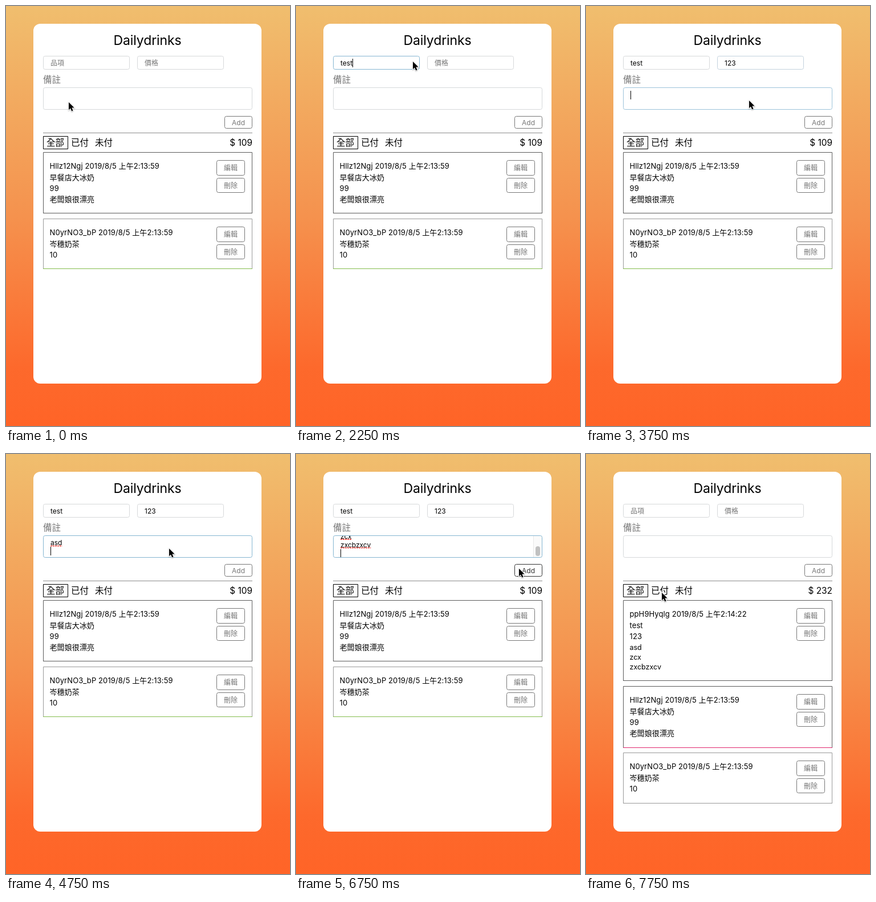
Recreate the animation shown at these times as an HTML page with a canvas. Size 498 by 733 pixels, loop 8000 ms.

```html
<!DOCTYPE html>
<html lang="zh-Hant">
<head>
<meta charset="utf-8">
<title>Dailydrinks</title>
<style>
html, body { margin: 0; width: 100%; height: 100%; overflow: hidden; }
canvas { display: block; width: 498px; height: 733px; }
</style>
</head>
<body>
<canvas id="stage" width="498" height="733"></canvas>
<script>
const ctx = document.getElementById('stage').getContext('2d');
const LOOP = 8000, STEP = 250, ADDED = 7000;
const FONT = 'Inter, "Noto Sans CJK TC", "Noto Sans CJK", sans-serif';
const GRAY = '#777';

// Each list holds [start time, value...]; a value lasts until the next one.
const POINTER = [
  [0, 110, 168], [250, 115, 158], [500, 131, 132], [750, 148, 105], [1000, 153, 93],
  [1250, 154, 92], [1500, 153, 92], [2250, 205, 97], [2500, 275, 103], [2750, 315, 111],
  [3000, 322, 116], [3250, 288, 165], [3750, 286, 165], [6250, 305, 172],
  [6500, 360, 192], [6750, 391, 200], [7500, 245, 226], [7750, 133, 242]
];
const ITEM = [[0, ''], [1500, 'te'], [2000, 'test'], [ADDED, '']];
const PRICE = [[0, ''], [3000, '1'], [3250, '123'], [ADDED, '']];
const MEMO = [
  [0, ''], [4250, 'a'], [4500, 'asd'], [4750, 'asd\n'], [5000, 'asd\nzcx'],
  [5250, 'asd\nzcx\n'], [5500, 'asd\nzcx\nzxcb'], [5750, 'asd\nzcx\nzxcbzxcv\n'], [ADDED, '']
];

const milk = ['Hllz12Ngj 2019/8/5 上午2:13:59', '早餐店大冰奶', '99', '老闆娘很漂亮'];
const tea = ['N0yrNO3_bP 2019/8/5 上午2:13:59', '岑穗奶茶', '10'];
const test = ['ppH9Hyqlg 2019/8/5 上午2:14:22', 'test', '123', 'asd', 'zcx', 'zxcbzxcv'];

const at = (keys, t) => keys.filter(k => k[0] <= t).pop();

function text(str, x, midY, size, color = '#000', align = 'left', spacing = 0) {
  ctx.font = `${size}px ${FONT}`;
  ctx.letterSpacing = spacing + 'px';
  ctx.textAlign = align;
  ctx.fillStyle = color;
  ctx.fillText(str, x, midY + size * 0.37);
}

function box(x, y, w, h, color, radius = 0) {
  ctx.beginPath();
  ctx.roundRect(x + 0.5, y + 0.5, w - 1, h - 1, radius);
  ctx.lineWidth = 1;
  ctx.strokeStyle = color;
  ctx.stroke();
}

function line(x1, x2, y, color) {
  ctx.fillStyle = color;
  ctx.fillRect(x1, y, x2 - x1, 1);
}

function button(label, x, y, w, h, color = GRAY) {
  box(x, y, w, h, color, 3);
  text(label, x + w / 2, y + h / 2 + 0.3, 12, color, 'center');
}

// Border fades between gray and blue when focus comes and goes.
function borderColor(t, from, to) {
  if (t < from || t >= to + STEP) return '#d6d8da';
  if (t >= to) return '#c3d2dd';
  return t === from ? '#9dc3da' : '#86b6d2';
}

function caret(x, y) {
  ctx.fillStyle = '#000';
  ctx.fillRect(Math.round(x), y, 1, 15);
}

function input(x, value, hint, t, from, to) {
  box(x, 87, 152, 24, borderColor(t, from, to), 3);
  text(value || hint, x + 13, 99.5, 12, value ? '#000' : GRAY);
  if (t >= from && t < to) caret(x + 13 + (value ? ctx.measureText(value).width : 0), 92);
}

function squiggle(x, w, y) {
  ctx.save();
  ctx.beginPath();
  ctx.setLineDash([3, 1]);
  ctx.moveTo(x, y);
  ctx.lineTo(x + w, y);
  ctx.lineWidth = 2;
  ctx.strokeStyle = '#f4625c';
  ctx.stroke();
  ctx.restore();
}

function memo(t) {
  const lines = at(MEMO, t)[1].split('\n');
  const last = lines.length - 1;
  const lead = 14.7;
  const top = Math.min(155, 173 - last * lead);
  ctx.save();
  ctx.beginPath();
  ctx.rect(66, 143, 365, 37);
  ctx.clip();
  lines.forEach((str, i) => {
    const y = top + i * lead;
    text(str, 78, y, 12);
    const w = ctx.measureText(str).width;
    if (i < last) squiggle(78, w, y + 5.5);
    else if (t >= 3750 && t < ADDED) caret(78 + w, Math.round(y - 7.5));
  });
  if (last > 1) {
    ctx.fillStyle = '#fafafa';
    ctx.fillRect(416, 143, 15, 37);
    ctx.fillStyle = '#e8e8e8';
    ctx.fillRect(416, 143, 1, 37);
    const h = last > 2 ? 17 : 23;
    ctx.beginPath();
    ctx.roundRect(420, 178 - h, 8, h, 4);
    ctx.fillStyle = '#c1c1c1';
    ctx.fill();
  }
  ctx.restore();
  box(65, 142, 367, 39, borderColor(t, 3750, ADDED), 3);
}

function card(y, h, rows, color, bottom = color) {
  box(65, y, 367, h, color);
  line(65, 432, y + h - 1, bottom);
  const offsets = [24.6, 44, 63, 82, 99, 116];
  rows.forEach((str, i) => {
    const small = rows === test && i > 2;
    text(str, 76.5, y + offsets[i], small ? 12.5 : 13, '#000', 'left', small ? 0 : 0.1);
  });
  button('編輯', 369, y + 14, 50, 27);
  button('刪除', 369, y + 45, 50, 26);
}

function pointer(x, y) {
  ctx.save();
  ctx.translate(x, y);
  ctx.beginPath();
  [[0, 0], [0, 13.2], [3, 10.4], [5.2, 15.4], [7.5, 14.4], [5.4, 9.6], [9.6, 9.4]]
    .forEach(p => ctx.lineTo(...p));
  ctx.closePath();
  ctx.shadowColor = 'rgba(0,0,0,.3)';
  ctx.shadowBlur = 2;
  ctx.shadowOffsetY = 1;
  ctx.lineWidth = 1.8;
  ctx.strokeStyle = '#fff';
  ctx.stroke();
  ctx.shadowColor = 'transparent';
  ctx.fillStyle = '#000';
  ctx.fill();
  ctx.restore();
}

function background() {
  const g = ctx.createLinearGradient(0, 0, 0, 733);
  g.addColorStop(0, '#f0be6e');
  g.addColorStop(0.5, '#f5924e');
  g.addColorStop(0.86, '#fd692c');
  g.addColorStop(1, '#ff6427');
  ctx.fillStyle = g;
  ctx.fillRect(0, 0, 498, 733);
  ctx.beginPath();
  ctx.roundRect(48, 31, 400, 628, 12);
  ctx.fillStyle = '#fff';
  ctx.fill();
}

function draw(t) {
  const added = t >= ADDED;
  background();
  text('Dailydrinks', 248, 59, 23, '#000', 'center', -0.1);
  input(65, at(ITEM, t)[1], '品項', t, 1000, 3000);
  input(230, at(PRICE, t)[1], '價格', t, 3000, 3750);
  text('備註', 65, 128, 15.5, GRAY);
  memo(t);
  button('Add', 383, 192, 49, 22, t >= 6750 && t < 7500 ? '#333' : GRAY);
  line(65, 432, 221, '#8c8c8c');

  box(65, 227, 44, 23, '#000');
  ['全部', '已付', '未付'].forEach((tab, i) => text(tab, [71, 114, 156][i], 238.7, 15.5));
  text(added ? '$ 232' : '$ 109', 432, 238.7, 15.4, '#000', 'right');

  if (added) {
    card(255, 141, test, '#5c5c5c');
    card(405, 108, milk, '#5c5c5c', '#e0266e');
    card(521, 89, tea, '#999');
  } else {
    card(255, 107, milk, '#5c5c5c');
    card(371, 88, tea, '#999', '#84bd4c');
  }
  const [, x, y] = at(POINTER, t);
  pointer(x, y);
}

function frame() {
  const t = performance.now() % LOOP;
  draw(Math.floor(t / STEP) * STEP);
  requestAnimationFrame(frame);
}
frame();
</script>
</body>
</html>
```
